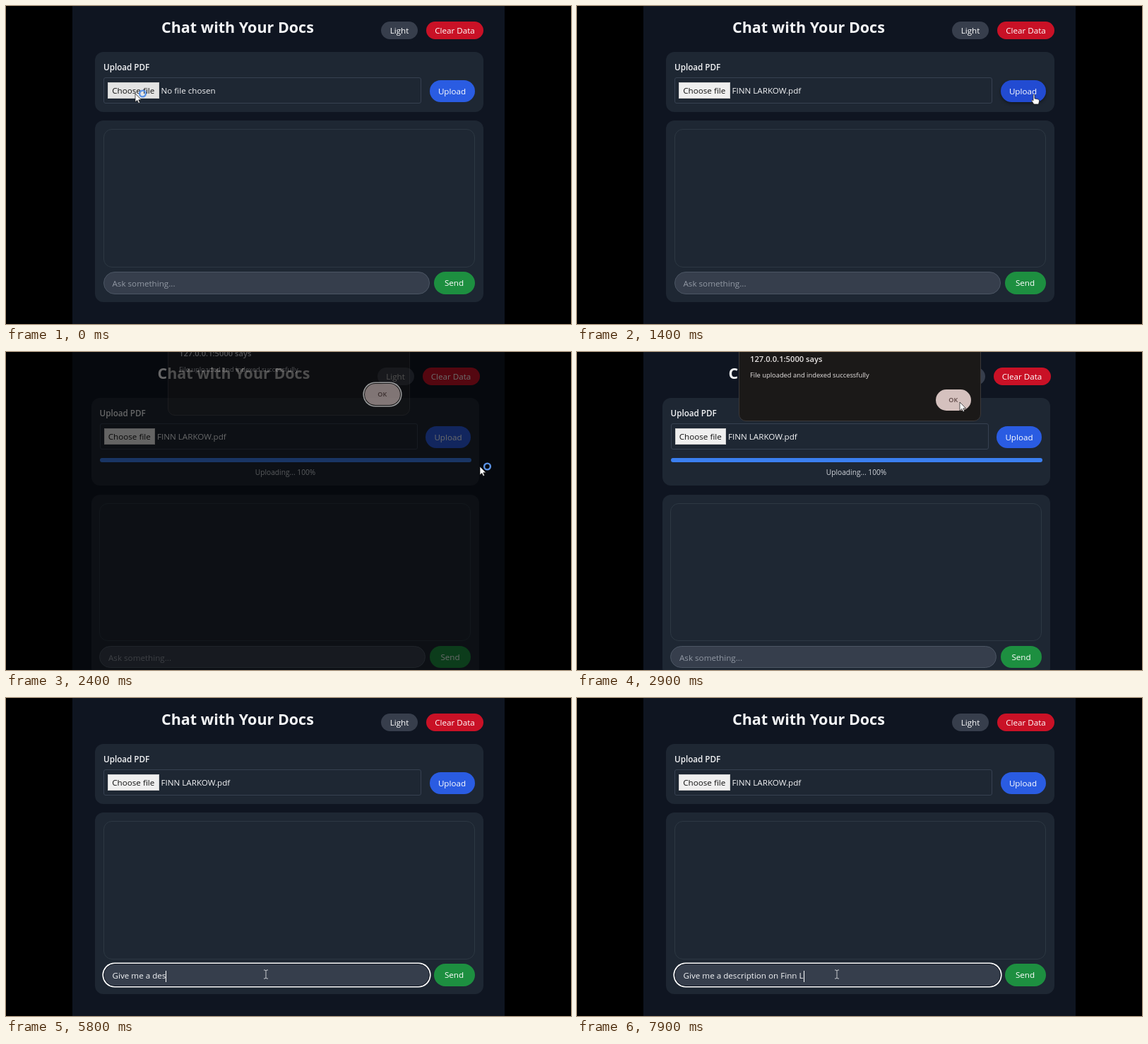
These frames come from a looping animation (800 px wide and 450 px high, 8000 ms). An HTML page:

```html
<!DOCTYPE html>
<html lang="en">
<head>
<meta charset="utf-8">
<title>Chat with Your Docs</title>
<style>
html, body { margin: 0; width: 100%; height: 100%; overflow: hidden; background: #000; }
body { font: 11.65px "Open Sans", "Noto Sans", sans-serif; color: #f3f4f6; }
div, svg { position: absolute; box-sizing: border-box; white-space: pre; }
#page { left: 94px; top: 0; width: 612px; height: 450px; background: #0f1521; overflow: hidden; }
#ui, #lower { left: 0; top: 0; width: 612px; height: 450px; }
.card { left: 32px; width: 549.5px; background: #1e2733; border-radius: 12px; }
.btn { border-radius: 16px; text-align: center; color: #fff; }
h1 { position: absolute; margin: 0; left: 126px; top: 14px; font-size: 21.5px; line-height: 32px; white-space: pre; }
#fileBox { left: 44px; top: 101px; width: 450px; height: 36.5px; border: 1px solid #374151; border-radius: 3px; }
#choose { left: 50px; top: 108px; width: 72.5px; height: 23px; line-height: 24px; background: #efefef; border: 1px solid #cfcfcf; color: #111; text-align: center; line-height: 22px; }
#chat { left: 43.5px; top: 174px; width: 526px; height: 195.5px; border: 1px solid #2d3843; border-radius: 12px; }
#input { left: 43.5px; top: 376px; width: 462px; height: 31.5px; line-height: 31px; padding-left: 12px; background: #363e4c; border: 1px solid #4b5563; border-radius: 16px; }
#input.focus { border-color: #0f1521; box-shadow: 0 0 0 1.6px #fff; }
#input span { display: inline-block; width: 1px; height: 16px; background: #fff; vertical-align: middle; }
#bar { left: 44px; top: 149.5px; height: 6.5px; border-radius: 4px; background: #3b7ff0; }
#percent { left: 44px; top: 160px; width: 526px; line-height: 20px; font-size: 10.2px; text-align: center; color: #d1d5db; }
#scrim { left: 0; top: 0; width: 612px; height: 450px; background: #000; opacity: .58; }
#dialog { left: 229px; top: 0; width: 343px; height: 450px; }
#panel { left: 0; top: -20px; width: 343px; height: 117.5px; background: #1b1918; border: 1px solid #3b3838; border-radius: 10px; color: #e8e4e3; }
#ok { left: 279px; top: 53px; width: 49.5px; height: 30px; border-radius: 15px; background: #d5c1be; color: #5b4543; font: 600 9px/30px "Open Sans", sans-serif; text-align: center; }
#ok.ring { box-shadow: 0 0 0 1px #1b1918, 0 0 0 2.6px #fff; }
#cursor { left: 0; top: 0; overflow: visible; }
</style>
</head>
<body>
<div id="page">
  <div id="ui">
    <h1>Chat with Your Docs</h1>
    <div class="btn" style="left:437px;top:22px;width:52px;height:24.5px;line-height:25px;background:#373e4c">Light</div>
    <div class="btn" style="left:501px;top:22px;width:81px;height:24.5px;line-height:25px;background:#c91126">Clear Data</div>
    <div class="card" id="uploadCard" style="top:65px"></div>
    <div style="left:44px;top:77px;line-height:20px;font-weight:600">Upload PDF</div>
    <div id="fileBox"></div>
    <div id="choose">Choose file</div>
    <div id="fileName" style="left:125.5px;top:109px;line-height:22px"></div>
    <div class="btn" id="upload" style="left:505.5px;top:104.5px;width:64px;height:31px;line-height:31px">Upload</div>
    <div id="bar"></div>
    <div id="percent"></div>
    <div id="lower">
      <div class="card" style="top:162px;height:257px"></div>
      <div id="chat"></div>
      <div id="input"></div>
      <div class="btn" style="left:511.5px;top:376px;width:58px;height:31.5px;line-height:32px;background:#1d8f40">Send</div>
    </div>
  </div>
  <div id="scrim"></div>
</div>
<div id="dialog">
  <div id="panel">
    <div style="left:15px;top:19px;line-height:20px;font-size:11.2px;font-weight:600">127.0.0.1:5000 says</div>
    <div style="left:15px;top:42px;line-height:20px;font-size:9.35px">File uploaded and indexed successfully</div>
  </div>
  <div id="ok">OK</div>
</div>
<svg id="cursor" width="1" height="1">
  <path id="arrow" d="M0 0V12L2.8 9.5 4.7 13.6 6.6 12.7 4.8 8.8H8.6Z" fill="#fff" stroke="#111" stroke-width=".7"/>
  <circle id="busy" cx="10.5" cy="0" r="4.4" fill="none" stroke="#5b93e6" stroke-width="2.4"/>
  <path id="hand" d="M-1 1Q0-1 1 1V6L6 7Q8 7.5 7.5 10L6.5 14H0L-3.5 9Q-3 7-1 9Z" fill="#fff" stroke="#111" stroke-width=".7"/>
  <path id="beam" d="M-3-6H-1L0-5 1-6H3M0-5V5M-3 6H-1L0 5 1 6H3" fill="none" stroke="#c4c7cc"/>
</svg>
<script>
const $ = id => document.getElementById(id);
const LOOP = 8000, PROMPT = "Give me a description on Finn Larkow";
const path = [[0, 183, 124], [900, 183, 124], [1300, 647, 125], [1600, 647, 125], [2200, 671, 162],
  [2400, 671, 162], [2800, 542, 71], [3000, 542, 71], [3600, 368, 391], [LOOP, 368, 391]];
const typing = [[0, 0], [4000, 0], [4200, 2], [5800, 13], [7900, 31], [LOOP, 31]];

const within = (t, a, b) => t >= a && t < b;
const clamp = v => Math.max(0, Math.min(1, v));
const show = (id, on) => $(id).style.display = on ? "" : "none";

// Linear interpolation through [time, ...values] keys
function sample(keys, t) {
  const i = keys.findIndex(k => k[0] > t), a = keys[i - 1], b = keys[i];
  const p = (t - a[0]) / (b[0] - a[0]);
  return a.slice(1).map((v, j) => v + (b[j + 1] - v) * p);
}

function render(t) {
  const progress = within(t, 1700, 3300);
  $("ui").style.left = progress ? "-5.5px" : 0;
  $("lower").style.top = progress ? "39.5px" : 0;
  $("uploadCard").style.height = progress ? "124px" : "84.5px";
  show("bar", progress);
  show("percent", progress);
  const done = clamp((t - 1700) / 300);
  $("bar").style.width = 526 * done + "px";
  $("percent").textContent = `Uploading... ${Math.round(done * 100)}%`;

  $("fileName").textContent = t < 900 ? "No file chosen" : "FINN LARKOW.pdf";
  $("choose").style.background = t < 1000 ? "#e3e3e3" : "#efefef";
  const hover = within(t, 1300, 1800);
  $("upload").style.background = hover ? "#224bd2" : "#2a5ce2";
  $("upload").style.boxShadow = hover ? "0 2px 4px #0006" : "none";

  show("scrim", within(t, 2400, 2900));
  show("dialog", within(t, 2400, 3000));
  const open = clamp((t - 2300) / 300);
  $("dialog").style.top = -8 * clamp((2600 - t) / 200) + "px";
  $("panel").style.opacity = open;
  $("ok").style.opacity = Math.sqrt(open);
  $("ok").className = t < 2800 ? "ring" : "";

  const focus = t >= 3700, count = Math.floor(sample(typing, t)[0] + 1e-6);
  const input = $("input");
  input.className = focus ? "focus" : "";
  input.style.color = count ? "#f3f4f6" : "#9299a4";
  input.textContent = count ? PROMPT.slice(0, count) : "Ask something...";
  if (focus) input[count ? "append" : "prepend"](document.createElement("span"));

  const [x, y] = sample(path, t), beam = t >= 3600;
  $("cursor").style.transform = `translate(${x}px, ${y}px)`;
  show("hand", hover);
  show("beam", beam);
  show("arrow", !hover && !beam);
  show("busy", t < 300 || within(t, 1900, 2500));
}

const start = performance.now();
function tick() {
  const t = (performance.now() - start) % LOOP;
  render(Math.floor(t / 100) * 100);
  requestAnimationFrame(tick);
}
tick();
</script>
</body>
</html>
```
